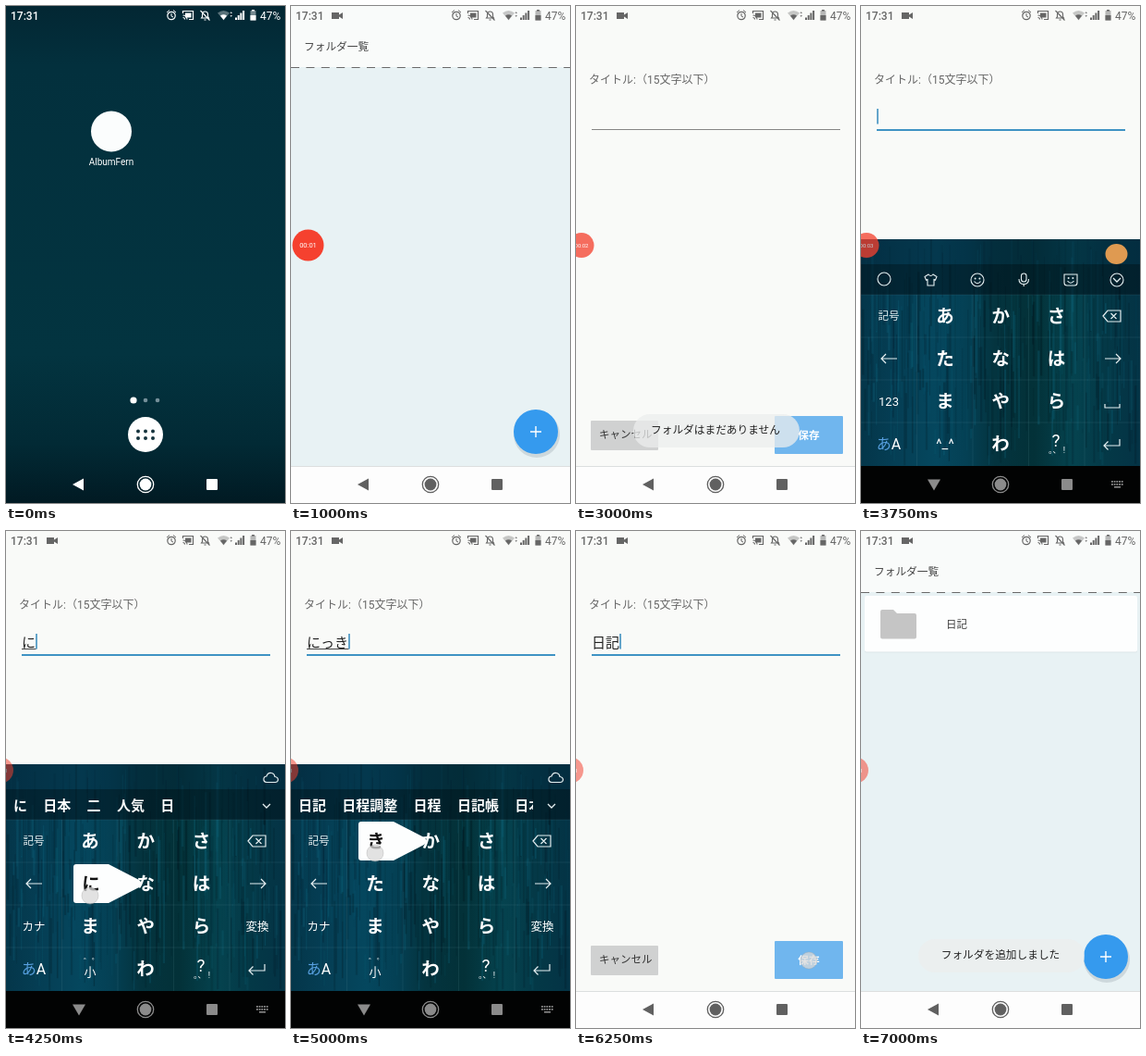
An HTML page that plays this animation: 302x537 px, repeating every 8 s.

```html
<!DOCTYPE html>
<html lang="ja">
<head>
<meta charset="utf-8">
<style>
html, body { margin: 0; width: 100%; height: 100%; overflow: hidden; background: #fff; }
svg { display: block; width: 302px; height: 537px; font-family: Roboto, "Noto Sans CJK JP", "Noto Sans CJK", sans-serif; }
</style>
</head>
<body>
<svg viewBox="0 0 302 537">
  <defs>
    <linearGradient id="wall" x2="0" y2="1">
      <stop stop-color="#032733"/><stop offset=".12" stop-color="#03303d"/>
      <stop offset=".7" stop-color="#033440"/><stop offset=".88" stop-color="#022a35"/>
      <stop offset="1" stop-color="#011a23"/>
    </linearGradient>
    <linearGradient id="wood">
      <stop stop-color="#04364a"/><stop offset=".12" stop-color="#053e54"/>
      <stop offset=".27" stop-color="#05475e"/><stop offset=".38" stop-color="#044054"/>
      <stop offset=".48" stop-color="#04343f"/><stop offset=".62" stop-color="#033138"/>
      <stop offset=".76" stop-color="#05434f"/><stop offset=".87" stop-color="#043947"/>
      <stop offset="1" stop-color="#043345"/>
    </linearGradient>
    <clipPath id="words"><path d="M0 279H262V312H0Z"/></clipPath>
  </defs>
  <g id="scene"></g>
</svg>
<script>
const STEP = 250, LOOP = 8000, LAST = 28;
const scene = document.getElementById('scene');

const rect = (x, y, w, h, fill, more = '') =>
  `<rect x="${x}" y="${y}" width="${w}" height="${h}" fill="${fill}" ${more}/>`;
const circle = (x, y, r, fill, more = '') =>
  `<circle cx="${x}" cy="${y}" r="${r}" fill="${fill}" ${more}/>`;
const line = (d, color, width = 1, more = '') =>
  `<path d="${d}" fill="none" stroke="${color}" stroke-width="${width}" ${more}/>`;
const shape = (d, fill) => `<path d="${d}" fill="${fill}"/>`;
const text = (x, y, s, size, fill, more = '') =>
  `<text x="${x}" y="${y}" font-size="${size}" fill="${fill}" ${more}>${s}</text>`;
const mid = (x, y, s, size, fill, more = '') =>
  text(x, y, s, size, fill, 'text-anchor="middle" ' + more);
const group = (attrs, body) => `<g ${attrs}>${body}</g>`;
const tap = (x, y) => circle(x, y, 9, '#d8d8d8', 'fill-opacity=".75" stroke="#aaa" stroke-opacity=".4"');
const BOLD = 'font-weight="600"';

function statusBar(c, recording) {
  return text(5, 15, '17:31', 12, c, 'font-weight="500"') +
    (recording ? shape('M44 7H52V9.5L56 7V14L52 11.5V14H44Z', c) : '') +
    circle(179, 10.5, 4.2, 'none', `stroke="${c}" stroke-width="1.2"`) +
    line('M179 8V11L181 12M174 7L177 4.5M184 7L181 4.5', c) +
    line('M191.5 8V5.5H202.5V14.5H198M191.5 10A4.5 4.5 0 0 1 196 14.5M191.5 12.5A2 2 0 0 1 193.5 14.5', c, 1.2) +
    rect(194, 7.5, 6.5, 5, c) +
    line('M211.5 13H219.5L218.5 11.5V9Q218.5 6 215.5 6Q212.5 6 212.5 9V11.5ZM214.5 15H216.5M210.5 5L220.5 15.5', c, 1.1) +
    group('opacity=".35"', shape('M229 7.5Q235.5 2.5 242 7.5L235.5 15.5Z', c)) +
    shape('M232 10.500Q235.500 8 239 10.500L235.500 15Z', c) +
    group('opacity=".8"', shape('M242.500 8L243.700 6L245 8ZM242.500 10L243.700 12L245 10Z', c)) +
    [0, 1, 2, 3].map(i => rect(248 + i * 2.7, 12.5 - i * 2.5, 2, 2.5 + i * 2.5, c)).join('') +
    group('opacity=".45"', rect(264.5, 5, 6, 10.5, c)) + rect(266, 4, 3, 1.5, c) + rect(264.5, 10, 6, 5.5, c) +
    text(275, 15, '47%', 12, c);
}

function navBar(c, down) {
  return shape(down ? 'M72 511.5H86L79 523.5Z' : 'M72 517L84 510.5V523.5Z', c) +
    circle(151, 517, 8.7, 'none', `stroke="${c}" stroke-width="1.3"`) + circle(151, 517, 6.4, c) +
    rect(217, 511, 12, 12, c, 'rx="1"');
}

const lightNav = () => rect(0, 497, 302, 40, '#fdfdfd') + line('M0 497.5H302', '#dcdfdf') + navBar('#606060');

function home() {
  let s = rect(0, 0, 302, 537, 'url(#wall)') + statusBar('#fff') +
    circle(114, 135.5, 22, '#fbfdfd') +
    mid(114, 172, 'AlbumFern', 10, '#fff') +
    circle(138, 426, 3.6, '#fff') + circle(151, 426, 2.3, '#75909a') + circle(164, 426, 2.3, '#75909a') +
    circle(151, 463, 19, '#fff');
  for (const x of [143, 151, 159]) for (const y of [459.5, 467]) s += circle(x, y, 2, '#16343e');
  return s + navBar('#fff');
}

function list(filled) {
  let s = rect(0, 0, 302, 67, '#f9fbfa') + statusBar('#666', true) +
    text(14, 48, 'フォルダ一覧', 11.7, '#444') +
    rect(0, 66, 302, 431, '#e8f2f4') +
    line('M0 66.5H302', '#6a6a6a', 1.1, 'stroke-dasharray="9 7.4"');
  if (filled) {
    s += rect(4, 70.5, 295, 61, '#cfdadd', 'rx="2" opacity=".5"') + rect(4, 70, 295, 60.5, '#fdfefe', 'rx="2"') +
      shape('M23 85H35L39 89H58Q60 89 60 91V114.5Q60 116.5 58 116.5H23Q21 116.5 21 114.5V87Q21 85 23 85Z', '#c5c5c5') +
      text(92, 105, '日記', 11.5, '#444');
  }
  return s + circle(266, 463, 25, '#b9c4c8', 'opacity=".55"') + circle(265, 460, 24, '#359aee') +
    line('M259 460H271M265 454V466', '#fff', 1.4) + lightNav();
}

function form(typed, focused, composing) {
  const end = 17.5 + typed.length * 15;
  return rect(0, 0, 302, 537, '#f9faf8') + statusBar('#666', true) +
    text(14, 84, 'タイトル:（15文字以下）', 12, '#666') +
    text(17, 125.5, typed, 15, '#222') +
    (composing ? line(`M17 127.5H${end}`, '#444') : '') +
    (focused ? line(`M${end + .5} 111V127.5`, '#3288bd', 1.5) + line('M17 134H286', '#3f93c4', 2)
             : line('M17 133.5H286', '#858585', 1)) +
    rect(16, 448, 73, 32, '#d0d1d1', 'rx="1"') + text(25, 467, 'キャンセル', 11.5, '#333') +
    rect(215, 443, 74, 41, '#70b6ee', 'rx="1"') + mid(252, 467.5, '保存', 11.7, '#fff', BOLD) +
    lightNav();
}

const toast = (s, strength) => group(`opacity="${strength}"`,
  rect(62, 441, 180, 36, '#eceeee', 'rx="18" opacity=".75"') + mid(151, 462, s, 11.7, '#222'));

// Wood grain: seeded vertical streaks
let seed = 7;
const random = () => (seed = seed * 16807 % 2147483647) / 2147483647;
const grain = Array.from({ length: 320 }, () => {
  const h = 20 + random() * 90;
  return rect(random() * 302, 252 + random() * (245 - h), .6 + random() * 2, h,
    random() < .65 ? '#001018' : '#12708a', `opacity="${(random() * .28).toFixed(2)}"`);
}).join('');

const W = '#e6eff1';
const chevron = (x, y) => line(`M${x - 4} ${y - 2}L${x} ${y + 2}L${x + 4} ${y - 2}`, W, 1.3);
const ring = (x, y, r = 7) => circle(x, y, r, 'none', `stroke="${W}" stroke-width="1.1"`);
const face = (x, y) => circle(x - 2.4, y - 1.5, 1, W) + circle(x + 2.4, y - 1.5, 1, W) +
  line(`M${x - 3.5} ${y + 1.5}Q${x} ${y + 6} ${x + 3.5} ${y + 1.5}`, W, 1.2);

const toolbar = () => ring(25, 295) +
  line('M73 290L69 292.5L70.5 296L72 295.5V302H79V295.5L80.5 296L82 292.5L78 290Q75.5 293 73 290Z', W, 1.1) +
  ring(126, 296) + face(126, 296) +
  rect(173.5, 289, 5.5, 9, 'none', `rx="2.7" stroke="${W}" stroke-width="1.1"`) +
  line('M171 295Q171 300.5 176.2 300.5Q181.5 300.5 181.5 295M176.2 300.5V303', W, 1.1) +
  line('M220 290H234V299Q234 302 231 302H223Q220 302 220 299Z', W, 1.1) + face(227, 295.5) +
  ring(277, 296) + chevron(277, 296);

function candidates(words) {
  let x = 8;
  const row = words.map(w => {
    const s = text(x, 302, w, 15, '#fff', BOLD);
    x += w.length * 15 + 17.3;
    return s;
  }).join('');
  return group('clip-path="url(#words)"', row) + chevron(282, 297) +
    line('M282 271.5Q278.5 271 279 267.5Q279.5 265 282 265Q283.5 260.5 287.5 261.5Q290.5 262 291 265.5Q294.5 266 294.5 269Q294 271.5 291.5 271.5Z', W, 1.2);
}

const followUps = () => [[36, '帳'], [120, 'を見る'], [214, 'を書く']]
  .map(([x, s]) => mid(x, 301.5, s, 15, '#fff', BOLD)).join('') +
  ring(282, 296, 7.5) + line('M279 293L285 299M285 293L279 299', W, 1.2);

function keyboard(top, composing) {
  let s = rect(0, 252, 302, 245, 'url(#wood)') + grain +
    rect(0, 252, 302, 27, '#04273a', 'opacity=".45"') + rect(0, 279, 302, 33, '#00141e', 'opacity=".6"');
  s += line('M0 312H302M0 358H302M0 404H302M0 450H302M60.5 312V497M121 312V497M181.5 312V497M242 312V497',
    '#6aa0a8', .6, 'opacity=".22"') + top;
  if (!composing) s += '<ellipse cx="276.5" cy="268" rx="12" ry="11" fill="#df9a51"/>';
  [...'あかさたなはまやら'].forEach((k, i) =>
    s += mid(91 + i % 3 * 60.3, 342 + Math.floor(i / 3) * 46, k, 19.5, '#fff', BOLD));
  s += mid(151, 480, 'わ', 19.5, '#fff', BOLD) +
    mid(211, 476, '?', 19, '#fff') + mid(212, 483, '。、 !', 9, '#fff') +
    mid(30, 339, '記号', 11.5, W) +
    mid(30, 432, composing ? 'カナ' : '123', composing ? 12.5 : 13, '#fff') +
    mid(30, 479, '<tspan fill="#58a0e0">あ</tspan>A', 16, '#fff') +
    (composing ? mid(91, 481, '小', 13, '#fff') + mid(93, 469, '゛゜', 9, '#fff') : mid(91, 478, '^_^', 15, '#fff')) +
    line('M39 381H22M27 376L22 381L27 386M264 381H281M276 376L281 381L276 386', W, 1.2) +
    line('M262 335L267 329H281V341H267ZM270.5 332L276.5 338M276.5 332L270.5 338', W, 1.2) +
    line('M280 468V475H263M267.5 470.5L263 475L267.5 479.5', W, 1.2);
  return s + (composing ? mid(272, 432, '変換', 12.5, '#fff') : line('M264 430V434H280V430', W, 1.2));
}

function darkNav() {
  let s = rect(0, 497, 302, 40, '#020303') + navBar('#8b8b8b', true);
  for (let i = 0; i < 10; i++) s += rect(271 + i % 5 * 2.7, 513 + Math.floor(i / 5) * 3, 1.8, 1.8, '#8b8b8b');
  return s + rect(274, 519, 7, 1.6, '#8b8b8b');
}

const flick = (x, y, s) => group(`transform="translate(${x} ${y})"`,
  shape('M-75 -21H-40L-7 -4Q-2 0 -7 4L-40 21H-75Q-78 21 -78 18V-18Q-78 -21 -75 -21Z', '#fdfefe') +
  mid(-59, 7, s, 19.5, '#111', BOLD) + tap(-60, 13));

function recorder(n) {
  const [x, r, opacity] = n < 9 ? [18.5, 17, 1] : n < 16 ? [6, 13.5, .76] : [-6, 14, .53];
  const label = n < 10 ? '00:01' : n < 14 ? '00:02' : '00:03';
  return group(`opacity="${opacity}"`, circle(x, 258.5, r, '#f5412f') +
    mid(x, 261 - (n < 9 ? 0 : .5), label, n < 9 ? 7.5 : 6, '#fff'));
}

const early = ['に', '日本', '二', '人気', '日'];
const diary = ['日記', '日程調整', '日程', '日記帳', '日本'];
const typing = {
  17: ['に', early, () => flick(151, 381, 'に')],
  18: ['につ', early, () => tap(91, 360)],
  19: ['にっ', early, () => tap(91, 473)],
  20: ['にっき', diary, () => flick(151, 335, 'き')],
  21: ['にっき', diary, () => tap(23, 297)]
};

function draw(n) {
  if (n < 3) {
    return home() + (n == 1 ? tap(114, 138) : '') +
      (n == 2 ? group('opacity=".7" transform="translate(0 24)"', list()) : '');
  }
  let s;
  if (n < 11) {
    s = list() + (n > 4 ? toast('フォルダはまだありません', n == 5 ? .6 : 1) : '') + (n == 10 ? tap(265, 462) : '');
  } else if (n < 14) {
    s = form('', n == 13) + (n < 13 ? toast('フォルダはまだありません', 1) : tap(120, 122));
  } else if (n < 17) {
    s = form('', true) + group(`transform="translate(0 ${n == 14 ? 120 : 0})"`, keyboard(toolbar())) + darkNav();
  } else if (n < 22) {
    const [typed, words, touch] = typing[n];
    s = form(typed, true, true) + keyboard(candidates(words), true) + darkNav() + touch();
  } else if (n < 24) {
    s = form('日記', true) + keyboard(followUps()) + darkNav() + (n == 23 ? tap(90, 529.5) : '');
  } else if (n < 26) {
    s = form('日記', true) + (n == 25 ? tap(252, 464) : '');
  } else {
    s = list(true) + (n > 26 ? toast('フォルダを追加しました', n == 27 ? .5 : 1) : '');
  }
  return s + recorder(n);
}

let shown = -1;
const start = performance.now();
function tick() {
  const t = (performance.now() - start) % LOOP;
  const n = Math.min(LAST, Math.floor(t / STEP));
  if (n != shown) scene.innerHTML = draw(shown = n);
  requestAnimationFrame(tick);
}
tick();
</script>
</body>
</html>
```
